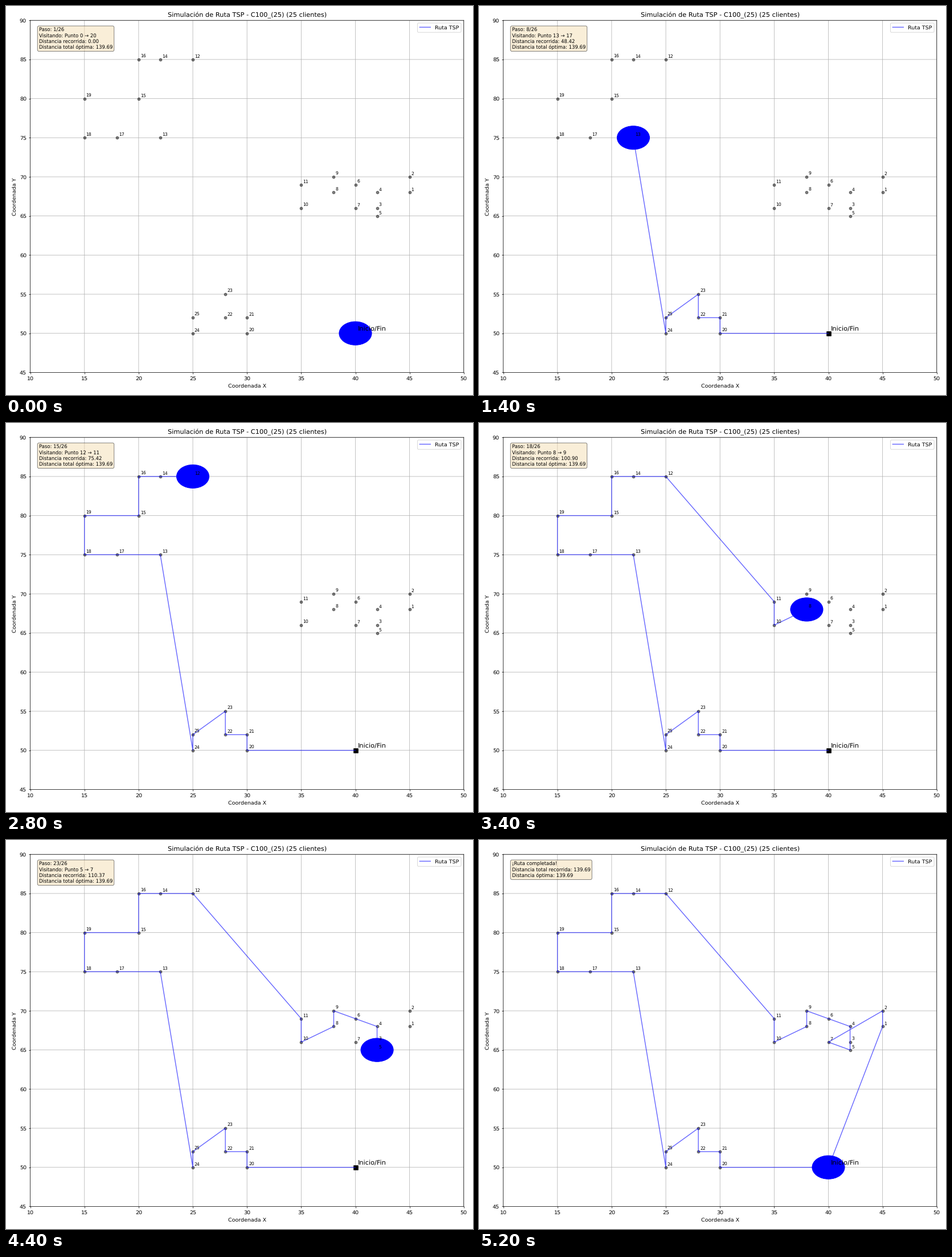
These frames come from a looping animation (820 by 683 pixels, 5400 ms). A matplotlib script:

```python
import numpy as np
import matplotlib.pyplot as plt
from matplotlib.animation import FuncAnimation
from matplotlib.patches import Circle

W, H = 820, 683
DPI = W / 12
STEP_MS = 200
GAPS = (0, 3, 5, 7, 10)


def cluster(x0, y0, *columns):
    """Clients in columns going left from x0, with heights above y0."""
    gaps = GAPS[-len(columns):]
    return [(x0 - g, y0 + h) for g, col in zip(gaps, columns) for h in col]


def dist(a, b):
    return np.hypot(*(points[a] - points[b]))


def plan_tour():
    """Nearest neighbour inside each group; client 1 is kept for last."""
    tour = [0]
    for group in (range(20, 26), range(12, 20), range(2, 12), [1], [0]):
        left = set(group)
        while left:
            nearest = min(sorted(left), key=lambda p: dist(tour[-1], p))
            tour.append(nearest)
            left.remove(nearest)
    return tour


east = cluster(45, 65, (3, 5), (1, 3, 0), (4, 1), (3, 5), (1, 4))
north = cluster(25, 75, (10,), (0, 10), (5, 10), (0,), (0, 5))
south = cluster(35, 50, (0, 2), (2, 5), (0, 2))
points = np.array([(40, 50)] + east + north + south)

tour = plan_tour()
path = points[tour]
legs = np.hypot(*np.diff(path, axis=0).T)
travelled = np.concatenate([[0], np.cumsum(legs)])
total = travelled[-1]
steps = len(legs)

# Unsnapped, unhinted drawing gives soft subpixel edges
plt.rcParams.update({"font.family": "DejaVu Sans", "path.snap": False,
                     "text.hinting": "none"})
fig = plt.figure(figsize=((W + 0.001) / DPI, (H + 0.001) / DPI), dpi=DPI,
                 facecolor="white")
x0, x1, y0, y1 = 42.6, 803.8, 25.2, 643.4
ax = fig.add_axes([x0 / W, 1 - y1 / H, (x1 - x0) / W, (y1 - y0) / H])
ax.set(xlim=(10, 50), ylim=(45, 90), xlabel="Coordenada X",
       ylabel="Coordenada Y",
       title="Simulación de Ruta TSP - C100_(25) (25 clientes)")
ax.grid(True)


def label(text, xy, offset, size):
    ax.annotate(text, xy, xytext=(offset, offset),
                textcoords="offset points", fontsize=size)


def dots(xy, marker, size, alpha):
    ax.scatter(*xy.T, s=size ** 2, marker=marker, facecolor="black",
               edgecolor="black", linewidth=1, alpha=alpha, zorder=2)


dots(points[:1], "s", 8, 1)
dots(points[1:], "o", 5, 0.5)
label("Inicio/Fin", points[0], 5, 12)
for i, xy in enumerate(points[1:], 1):
    label(str(i), xy, 3, 8)

route, = ax.plot([], [], "b-", lw=1.5, alpha=0.6, label="Ruta TSP")
vehicle = ax.add_patch(Circle(points[0], 1.5, color="blue", zorder=2.5))
info = ax.text(0.02, 0.98, "", transform=ax.transAxes, fontsize=9, va="top",
               bbox=dict(boxstyle="round", facecolor="wheat", alpha=0.5))
ax.legend(loc="upper right")


def status(k):
    if k == steps:
        return ("¡Ruta completada!\n"
                f"Distancia total recorrida: {total:.2f}\n"
                f"Distancia óptima: {total:.2f}")
    return (f"Paso: {k + 1}/{steps}\n"
            f"Visitando: Punto {tour[k]} → {tour[k + 1]}\n"
            f"Distancia recorrida: {travelled[k]:.2f}\n"
            f"Distancia total óptima: {total:.2f}")


def update(k):
    route.set_data(*path[:k + 1].T)
    vehicle.center = tuple(path[k])
    info.set_text(status(k))
    return route, vehicle, info


anim = FuncAnimation(fig, update, frames=steps + 1, interval=STEP_MS,
                     init_func=lambda: update(0), repeat=True, repeat_delay=0)
plt.show()
```
